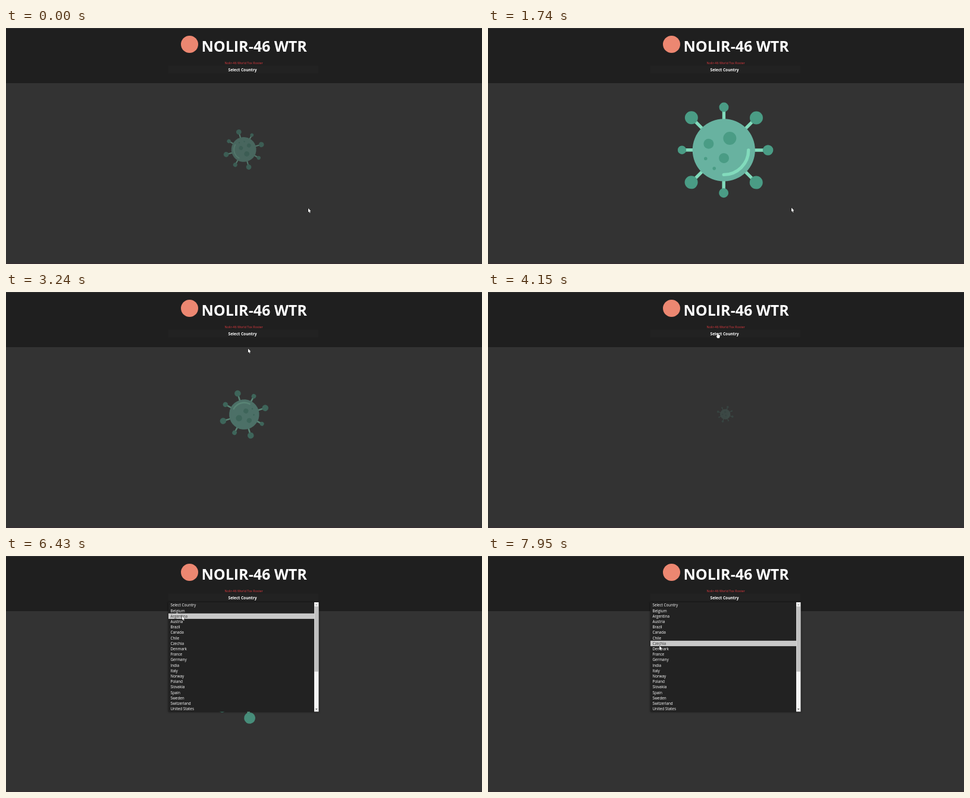
An HTML page with a canvas for the animation above (8000 ms loop, 800 by 398 pixels).

```html
<!DOCTYPE html>
<html lang="en">
<head>
<meta charset="utf-8">
<title>Nolir-46 WTR</title>
<style>
  html, body { margin: 0; width: 100%; height: 100%; overflow: hidden; background: #333; }
  canvas { display: block; width: 800px; height: 398px; }
</style>
</head>
<body>
<canvas id="stage"></canvas>
<script>
const W = 800, H = 398, LOOP = 8000, TAU = Math.PI * 2;
const FONT = '"Open Sans", "Noto Sans", sans-serif';
const canvas = document.getElementById('stage');
const ctx = canvas.getContext('2d');
const dpr = window.devicePixelRatio || 1;
canvas.width = W * dpr;
canvas.height = H * dpr;

const BG = [51, 51, 51];
const BODY = [104, 178, 160], DARK = [74, 156, 133], LIGHT = [130, 219, 188];
const TURN = 2600, PEAK = 1740;

const OPEN_AT = 5030, HITCH = 110;
const LIST = { x: 273, y: 78, w: 252.5, h: 184.5, bar: 7.5, row: 9.21 };
const COUNTRIES = ['Select Country', 'Belgium', 'Argentina', 'Austria', 'Brazil', 'Canada',
  'Chile', 'Czechia', 'Denmark', 'France', 'Germany', 'India', 'Italy', 'Norway', 'Poland',
  'Slovakia', 'Spain', 'Sweden', 'Switzerland', 'United States'];

// Pointer stops: the page, the select box, then down the list
const STOPS = [
  { t: 0, x: 508, y: 304 },
  { t: 800, x: 510, y: 305 },
  { t: 1740, x: 510, y: 303 },
  { t: 2560, x: 496.5, y: 209 },
  { t: 3400, x: 386, y: 69 },
  { t: 5060, x: 386, y: 69 },
  { t: 6430, x: 296, y: 101 },
  { t: LOOP, x: 288, y: 153 }
];

const mix = (a, b, k) => a + (b - a) * k;

function box(x, y, w, h, color) {
  ctx.fillStyle = color;
  ctx.fillRect(x, y, w, h);
}

function disc(x, y, r, color) {
  ctx.fillStyle = color;
  ctx.beginPath();
  ctx.arc(x, y, r, 0, TAU);
  ctx.fill();
}

function label(text, x, y, size, color, weight = 400, align = 'left') {
  ctx.font = `${weight} ${size}px ${FONT}`;
  ctx.textAlign = align;
  ctx.fillStyle = color;
  ctx.fillText(text, x, y);
}

function triangle(x, y, size, color) {
  ctx.fillStyle = color;
  ctx.beginPath();
  ctx.moveTo(x - Math.abs(size), y + size / 2);
  ctx.lineTo(x + Math.abs(size), y + size / 2);
  ctx.lineTo(x, y - size / 2);
  ctx.fill();
}

function pointerAt(t) {
  const i = STOPS.findIndex(s => s.t > t);
  const a = STOPS[i - 1], b = STOPS[i];
  const k = (t - a.t) / (b.t - a.t);
  return { x: mix(a.x, b.x, k), y: mix(a.y, b.y, k) };
}

function drawHeader() {
  box(0, 0, W, H, '#333');
  box(0, 1, W, 92, '#1f1f1f');
  box(0, 396.5, W, 1.5, '#372f33');
  disc(308.5, 27.5, 14.5, '#ec8771');
  label('NOLIR-46 WTR', 328.5, 40, 25, '#fff', 700);
  label('Nolir-46 World Tox Roster', 399.5, 61.3, 5.4, '#e0393f', 400, 'center');
  box(273, 63.5, 252, 13, '#222');
  label('Select Country', 397.5, 72.6, 6.6, '#fff', 700, 'center');
}

function drawSpikes(light, dark) {
  ctx.lineWidth = 5.4;
  ctx.strokeStyle = light;
  for (let i = 0; i < 8; i++) {
    const a = i * TAU / 8, cos = Math.cos(a), sin = Math.sin(a);
    const big = i % 2;
    const reach = big ? 77.2 : 72.3 + 2 * cos;
    ctx.beginPath();
    ctx.moveTo(cos * 50, sin * 50);
    ctx.lineTo(cos * reach, sin * reach);
    ctx.stroke();
    disc(cos * reach, sin * reach, big ? 11 : 8 + 0.8 * cos, dark);
  }
}

// Grows and shrinks over two full turns; opacity equals scale.
function drawVirus(t) {
  const turns = (t - PEAK) / TURN;
  const scale = 1 - 0.9 * Math.abs(turns - 2 * Math.round(turns / 2));
  const tint = c => `rgb(${c.map((v, i) => Math.round(mix(BG[i], v, scale)))})`;
  const dark = tint(DARK), light = tint(LIGHT);

  ctx.save();
  ctx.translate(399.1, 205.9);
  ctx.rotate(turns * TAU);
  ctx.scale(scale, scale);
  ctx.translate(-2.8, 0);
  drawSpikes(light, dark);
  disc(0, 0, 52.6, tint(BODY));
  disc(10, -20, 11, dark);
  disc(-25.5, -10.5, 8.5, dark);
  disc(0.3, 13.5, 8.5, dark);
  disc(-30.5, 14.5, 2.8, dark);
  disc(-16, 31, 2.8, dark);
  ctx.lineCap = 'round';
  ctx.beginPath();
  ctx.arc(0, 0, 41.5, 0, TAU / 4);
  ctx.stroke();
  ctx.restore();
}

function drawList(pointerY) {
  const { x, y, w, h, bar, row } = LIST;
  const inner = w - bar, barX = x + inner;
  const hover = Math.max(0, Math.floor((pointerY - y - 0.4) / row));
  ctx.save();
  ctx.shadowColor = 'rgba(0,0,0,.6)';
  ctx.shadowBlur = 3 * dpr;
  box(x, y, w, h, '#222');
  ctx.restore();
  COUNTRIES.forEach((name, i) => {
    const top = y + 0.4 + i * row;
    if (i === hover) box(x, top, inner, row, '#c8c8c8');
    label(name, x + 3.4, top + 6.9, 6.35, i === hover ? '#333' : '#fff');
  });
  box(barX, y, bar, h, '#f5f5f5');
  box(barX + 0.4, y + 7, bar - 0.8, 110, '#c1c1c1');
  triangle(barX + bar / 2, y + 4, 2, '#a3a3a3');
  triangle(barX + bar / 2, y + h - 4, -2, '#505050');
}

const ARROW = new Path2D('M0 0V6.8L1.5 5.6L2.5 8L3.6 7.5L2.6 5.2L4.6 5Z');
const HAND = new Path2D('M-.8 0H.5L.7 3L4 4.2L3 8.8H-.6L-2.6 5.3L-.9 5.6Z');

function drawPointer({ x, y }, shape) {
  ctx.save();
  ctx.translate(x, y);
  ctx.lineWidth = 0.9;
  ctx.lineJoin = 'round';
  ctx.strokeStyle = '#111';
  ctx.stroke(shape);
  ctx.fillStyle = '#fff';
  ctx.fill(shape);
  ctx.restore();
}

function draw(t) {
  const open = t >= OPEN_AT;
  const pointer = pointerAt(t);
  const onSelect = !open && pointer.y > 63 && pointer.y < 77;
  ctx.setTransform(dpr, 0, 0, dpr, 0, 0);
  drawHeader();
  // Opening the list makes the spin skip ahead.
  drawVirus(open ? t + HITCH : t);
  if (open) drawList(pointer.y);
  drawPointer(pointer, onSelect ? HAND : ARROW);
}

const start = performance.now();
function tick() {
  draw((performance.now() - start) % LOOP);
  requestAnimationFrame(tick);
}
tick();
</script>
</body>
</html>
```
